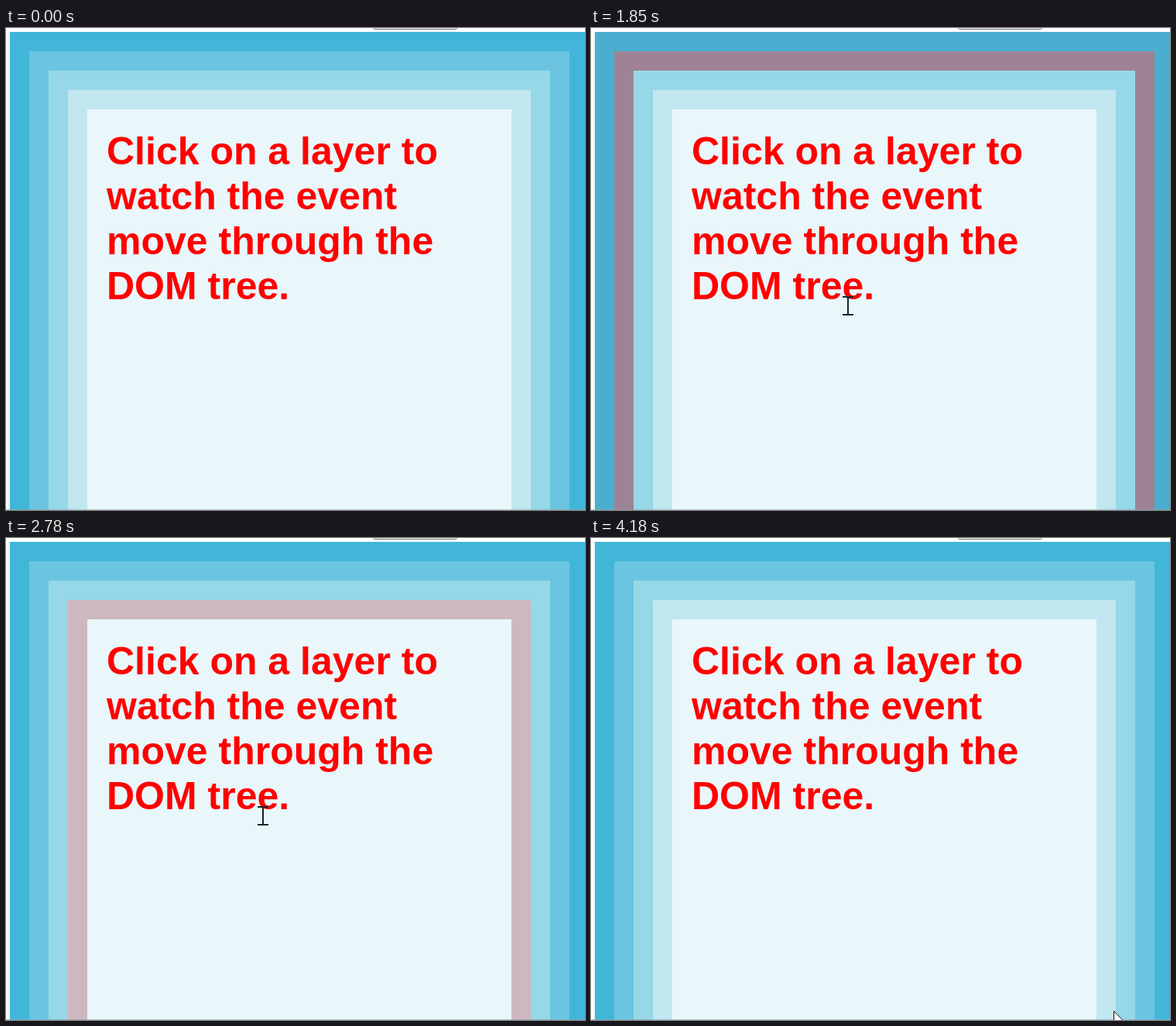
Recreate the animation shown at these times as an HTML page. Size 748x622 px, loop 4800 ms.

```html
<!DOCTYPE html>
<html lang="en">
<head>
<meta charset="utf-8">
<title>Event flow</title>
<style>
  html, body { margin: 0; width: 100%; height: 100%; overflow: hidden; background: #fff; }
  svg { display: block; width: 748px; height: 622px; }
  text { font: bold 50px "Liberation Sans", Arial, sans-serif; fill: #f00; }
</style>
</head>
<body>
<svg viewBox="0 0 748 622">
  <rect x="3" y="5" width="1" height="617" fill="#e6ecee"/>
  <rect x="474.5" y="-12" width="108" height="13.5" rx="2" fill="#f4f4f4" stroke="#777"/>
  <g id="layers"></g>
  <rect y="621" width="748" height="1" fill="#8fa9b1" opacity=".6"/>
  <g id="label"></g>
  <path id="beam" fill="none" stroke="#10282c" stroke-width="2"
        d="M-7 -12H-2L0 -11L2 -12H7M0 -11V11M-7 11H7"/>
  <path id="arrow" fill="#fff" stroke="#111" stroke-linejoin="round"
        d="M.5 .5V24L6 19L9.5 26.5L13 25L9.7 18H17.5Z"/>
  <circle id="press" cx="329" cy="358" r="18" fill="#f7f94c" opacity=".7"/>
</svg>
<script>
const LOOP = 4800;
const STEP = 200;          // time from one layer to the next
const FIRST = 1674;        // outermost layer at full tint
const TINT = 0.38;
const TEXT_END = 362;      // the text cursor shows above this line

const colors = [[65, 182, 216], [107, 197, 224], [150, 215, 232], [193, 231, 241], [233, 247, 251]];
const lines = ["Click on a layer to", "watch the event", "move through the", "DOM tree."];

// time, x, y of the pointer
const path = [
  [420, 668, 622], [910, 337, 357], [1150, 337, 357], [1220, 332, 359],
  [3400, 332, 359], [3470, 342, 364], [4180, 675, 610]
];

const $ = id => document.getElementById(id);

function add(parent, tag, attrs) {
  const el = document.createElementNS("http://www.w3.org/2000/svg", tag);
  for (const key in attrs) el.setAttribute(key, attrs[key]);
  return parent.appendChild(el);
}

const layers = colors.map((c, i) => {
  const edge = 5 + 25 * i;
  return add($("layers"), "rect", { x: edge, y: edge, width: 748 - 50 * i, height: 640 });
});
lines.forEach((line, i) => {
  add($("label"), "text", { x: 130, y: 176 + 58 * i }).textContent = line;
});

const pulse = (t, peak) => Math.max(0, 1 - Math.abs(t - peak) / STEP);
const smooth = u => u * u * (3 - 2 * u);

// Down through the layers, a short rest on the innermost, then back up.
function tint(t, i) {
  const down = pulse(t, FIRST + STEP * i);
  const up = i < 4 ? pulse(t, FIRST + STEP * (9 - i)) : 0;
  return TINT * Math.max(down, up);
}

function pointer(t) {
  const next = path.findIndex(p => p[0] > t);
  if (next < 0) return path[path.length - 1].slice(1);
  const [t0, x0, y0] = path[Math.max(0, next - 1)];
  const [t1, x1, y1] = path[next];
  const u = t1 > t0 ? smooth((t - t0) / (t1 - t0)) : 0;
  return [x0 + (x1 - x0) * u, y0 + (y1 - y0) * u];
}

function show(el, visible) {
  el.setAttribute("visibility", visible ? "visible" : "hidden");
}

function draw(t) {
  layers.forEach((el, i) => {
    const k = tint(t, i);
    const [r, g, b] = colors[i].map((v, n) => Math.round(v + ((n ? 0 : 255) - v) * k));
    el.setAttribute("fill", `rgb(${r},${g},${b})`);
  });

  const [x, y] = pointer(t);
  const inside = t >= 460;
  const overText = y < TEXT_END;
  const at = `translate(${Math.round(x)} ${Math.round(y)})`;
  $("beam").setAttribute("transform", at);
  $("arrow").setAttribute("transform", at);
  show($("beam"), inside && overText);
  show($("arrow"), inside && !overText);
  show($("press"), t >= 1390 && t < 1474);
}

const start = performance.now();
function tick() {
  draw((performance.now() - start) % LOOP);
  requestAnimationFrame(tick);
}
tick();
</script>
</body>
</html>
```
